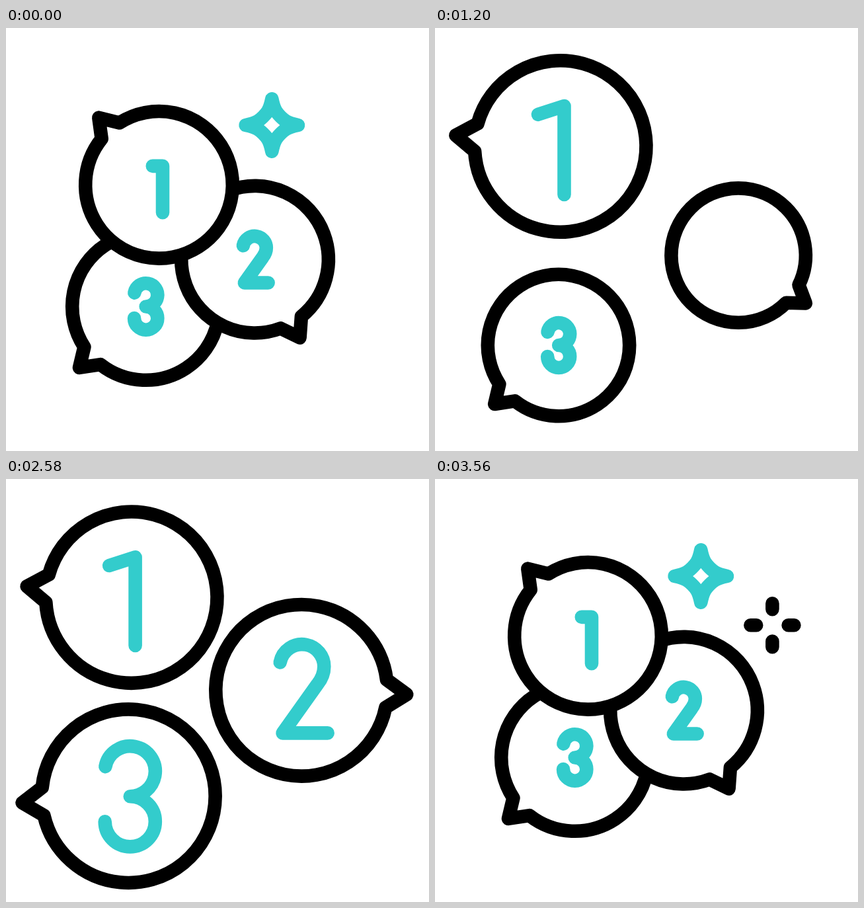
Animation, 640 px wide and 640 px high, one loop 3.6 s. Source, as an HTML page with a canvas:

```html
<!DOCTYPE html>
<html lang="en">
<head>
<meta charset="utf-8">
<title>Numbered bubbles</title>
<style>
  html, body { margin: 0; width: 100%; height: 100%; overflow: hidden; background: #fff; }
  canvas { display: block; width: 640px; height: 640px; }
</style>
</head>
<body>
<canvas id="stage"></canvas>
<script>
const LOOP = 3600, STEP = 20, LAST = 3560;
const TEAL = '#33cccc', BLACK = '#000', LINE = 20.6;
const SPREAD = [0, 300], RETURN = [2560, 3120], MORPH = 740, FADE = 205;
const SHRINK = 0.963;
const TAIL_REACH = 1.227, TAIL_HALF = 0.163;

const canvas = document.getElementById('stage');
const ctx = canvas.getContext('2d');
const ratio = window.devicePixelRatio || 1;
canvas.width = canvas.height = 640 * ratio;

const progress = (t, [from, to]) => Math.min(1, Math.max(0, (t - from) / (to - from)));

// Ease-in-out with handles at .42 and .58.
function ease(x) {
  let u = x;
  for (let i = 0; i < 5; i++) {
    const error = 1.26 * u - 0.78 * u * u + 0.52 * u ** 3 - x;
    u -= error / (1.26 - 1.56 * u + 1.56 * u * u);
  }
  return u * u * (3 - 2 * u);
}
const eased = (t, span) => ease(progress(t, span));

// Each digit is drawn around its own middle at height h.
function drawOne(h) {
  ctx.moveTo(11.8 - 0.383 * h, 0.2 * h - 14 - h / 2);
  ctx.lineTo(0, -h / 2);
  ctx.lineTo(0, h / 2);
}

function drawTwo(h) {
  const r = h / 4;
  ctx.arc(0, -r, r, Math.PI * 1.06, Math.PI * 2);
  ctx.bezierCurveTo(r, -0.68 * r, 0.9 * r, -0.45 * r, 0.7 * r, -0.2 * r);
  ctx.lineTo(-0.87 * r, 2 * r);
  ctx.lineTo(1.16 * r, 2 * r);
}

function drawThree(h) {
  const r = h / 4;
  ctx.arc(0, -r, r, Math.PI * 1.06, Math.PI * 2.5);
  ctx.arc(0, r, r, -Math.PI / 2, Math.PI);
}

// The tail is a vector, so blending two states turns and resizes the bubble together.
function state(x, y, radius, degrees, height, dx, dy) {
  const a = degrees * Math.PI / 180;
  return { x, y, tailX: radius * Math.cos(a), tailY: radius * Math.sin(a), height, dx, dy };
}
const rest = (x, y, degrees, dx, dy) => state(x, y, 111.3, degrees, 70.5, dx, dy);

function mix(a, b, f) {
  const blend = {};
  for (const key in a) blend[key] = a[key] + (b[key] - a[key]) * f;
  return blend;
}

function moved(s, x, y) {
  const copy = { x, y };
  for (const key of ['tailX', 'tailY', 'height', 'dx', 'dy']) copy[key] = s[key] * SHRINK;
  return copy;
}

function bubble(draw, start, home, away, big) {
  const end = start + MORPH;
  return {
    draw, home, big, away: moved(home, ...away), morph: [start, end],
    fadeOut: [start - FADE, start], fadeIn: [end - 15 - FADE, end - 15]
  };
}

// Back to front.
const bubbles = [
  bubble(drawThree, 1604, rest(211.5, 421.5, 137.4, 0.2, 0), [187, 480],
    state(185.3, 479.8, 131.4, 176.4, 152.4, 2.4, 0.6)),
  bubble(drawTwo, 880, rest(376.5, 350.2, 60.1, -0.3, 0), [466.5, 359.3],
    state(447.3, 319.7, 130, 2.1, 134.4, 0.6, -2.5)),
  bubble(drawOne, 300, rest(231.5, 237.3, 228.1, 5.5, 6.7), [175.7, 177.4],
    state(189.7, 179, 129.8, 186, 134, 5.8, 6))
];

function pose(b, t) {
  if (t >= RETURN[0]) return mix(b.big, b.home, eased(t, RETURN));
  const apart = mix(b.home, b.away, eased(t, SPREAD));
  return mix(apart, b.big, eased(t, b.morph));
}

function drawBubble(b, t) {
  const s = pose(b, t);
  const radius = Math.hypot(s.tailX, s.tailY), turn = Math.atan2(s.tailY, s.tailX);

  ctx.save();
  ctx.translate(s.x, s.y);
  ctx.beginPath();
  ctx.arc(0, 0, radius, turn + TAIL_HALF, turn - TAIL_HALF + Math.PI * 2);
  ctx.lineTo(s.tailX * TAIL_REACH, s.tailY * TAIL_REACH);
  ctx.closePath();
  ctx.fillStyle = '#fff';
  ctx.fill();
  ctx.strokeStyle = BLACK;
  ctx.stroke();

  ctx.translate(s.dx, s.dy);
  ctx.globalAlpha = 1 - progress(t, b.fadeOut) + progress(t, b.fadeIn);
  ctx.strokeStyle = TEAL;
  ctx.beginPath();
  b.draw(s.height);
  ctx.stroke();
  ctx.restore();
}

// Repeats one part of a path in four quarter turns, then strokes it.
function strokeQuarters(x, y, scale, alpha, color, part) {
  ctx.save();
  ctx.globalAlpha = alpha;
  ctx.translate(x, y);
  ctx.scale(scale, scale);
  ctx.strokeStyle = color;
  ctx.beginPath();
  for (let i = 0; i < 4; i++) {
    part(i);
    ctx.rotate(Math.PI / 2);
  }
  ctx.stroke();
  ctx.restore();
}

function drawStar(t) {
  const rise = eased(t, [2900, 3140]);
  const scale = 1 + 0.38 * (rise - eased(t, [3140, 3400]));
  const alpha = 1 - eased(t, SPREAD) + rise;
  strokeQuarters(402.3, 147, scale, alpha, TEAL, i => {
    if (i === 0) ctx.moveTo(0, -39.7);
    ctx.bezierCurveTo(3.5, -22.5, 7.5, -18.5, 13, -13);
    ctx.bezierCurveTo(18.5, -7.5, 22.5, -3.5, 39.7, 0);
    if (i === 3) ctx.closePath();
  });
}

function drawGlint(t) {
  strokeQuarters(510.4, 221.3, 1, progress(t, [3290, 3550]), BLACK, () => {
    ctx.moveTo(24.2, 0);
    ctx.lineTo(33, 0);
  });
}

function render(now) {
  const t = Math.min(LAST, Math.floor((now % LOOP) / STEP) * STEP);
  ctx.setTransform(ratio, 0, 0, ratio, 0, 0);
  ctx.fillStyle = '#fff';
  ctx.fillRect(0, 0, 640, 640);
  ctx.lineWidth = LINE;
  ctx.lineCap = ctx.lineJoin = 'round';
  bubbles.forEach(b => drawBubble(b, t));
  drawStar(t);
  drawGlint(t);
}

const start = performance.now();
function tick() {
  render(performance.now() - start);
  requestAnimationFrame(tick);
}
tick();
</script>
</body>
</html>
```
